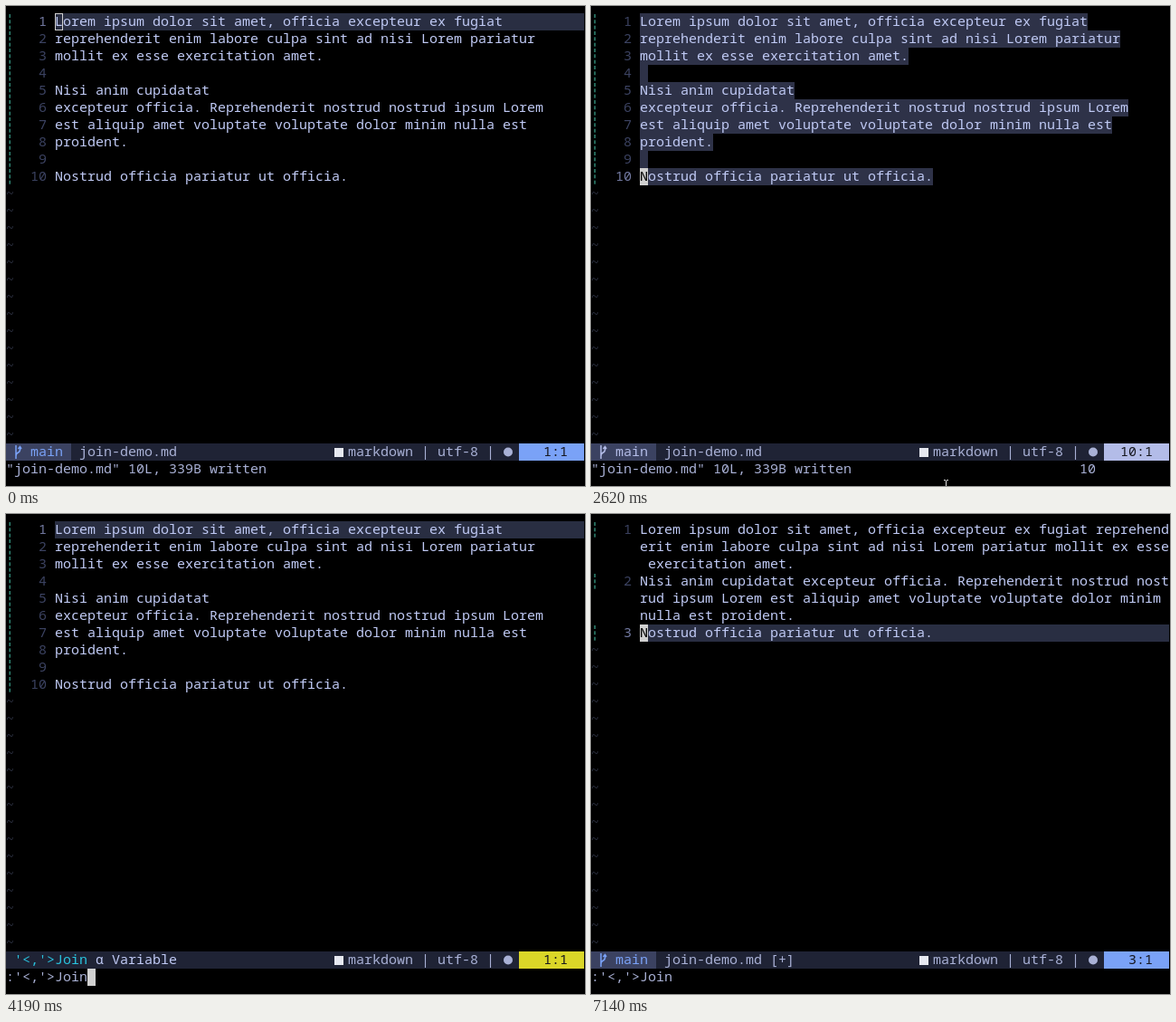
Recreate the animation shown at these times as an HTML page with a canvas. Size 640 px wide and 530 px high, loop 7.9 s.

```html
<!DOCTYPE html>
<html lang="en">
<head>
<meta charset="utf-8">
<style>
  html, body { margin: 0; background: #000; overflow: hidden; }
  canvas { display: block; }
</style>
</head>
<body>
<canvas id="screen" width="640" height="530"></canvas>
<script>
const ctx = document.getElementById('screen').getContext('2d');
const LOOP = 7900, CW = 9, RH = 19, TOP = 8, GUTTER = 6, COLS = 71;
const STATUS = 25, COMMAND = 26;
const FG = '#c0caf5', DIM = '#a9b1d6', BAR = '#1f2335', CURSOR = '#d0d0d0';
const CURSOR_LINE = '#292e42', VISUAL = '#2e3248', SIGN = '#2f8573';
const MODE_COLOR = { normal: '#7aa2f7', visual: '#b3bce8', command: '#dad628' };

const before = [
  'Lorem ipsum dolor sit amet, officia excepteur ex fugiat',
  'reprehenderit enim labore culpa sint ad nisi Lorem pariatur',
  'mollit ex esse exercitation amet.',
  '',
  'Nisi anim cupidatat',
  'excepteur officia. Reprehenderit nostrud nostrud ipsum Lorem',
  'est aliquip amet voluptate voluptate dolor minim nulla est',
  'proident.',
  '',
  'Nostrud officia pariatur ut officia.'
];
const after = before.join('\n').split('\n\n').map(p => p.replace(/\n/g, ' '));

const rowY = row => TOP + row * RH;

function cells(col, row, count, color) {
  ctx.fillStyle = color;
  ctx.fillRect(col * CW, rowY(row), count * CW, RH);
}

function text(str, col, row, color) {
  ctx.fillStyle = color;
  ctx.fillText(str, col * CW, rowY(row) + 14);
}

function cursor(col, row, char = '') {
  cells(col, row, 1, CURSOR);
  text(char, col, row, '#000');
}

function sign(row) {
  ctx.fillStyle = SIGN;
  for (let i = 0; i < 3; i++) ctx.fillRect(3.5, rowY(row) + 1 + i * RH / 3, 1.5, 4);
}

// Wraps a buffer line to the window width.
const wrap = line => line.match(/.{1,65}/g) || [''];

// Draws the buffer; returns the first screen row of the active line.
function buffer(lines, active, selectTo, highlight) {
  let row = 0, activeRow = 0;
  lines.forEach((line, i) => {
    const number = String(i + 1);
    if (i === active) activeRow = row;
    sign(row);
    text(number, 5 - number.length, row, i === active ? '#737aa2' : '#3b4261');
    for (const part of wrap(line)) {
      if (i <= selectTo) cells(GUTTER, row, Math.max(1, part.length), VISUAL);
      else if (i === active && highlight) cells(GUTTER, row, COLS - GUTTER, CURSOR_LINE);
      text(part, GUTTER, row++, FG);
    }
  });
  while (row < STATUS) text('~', 0, row++, '#2b3040');
  return activeRow;
}

function branchIcon(color) {
  ctx.strokeStyle = color;
  ctx.lineWidth = 1.5;
  ctx.stroke(new Path2D('M11 485V500M11 497Q11 494 13.5 493T15.5 487M13.5 489L15.5 486.5L17 489'));
}

function statusBar(mode, file, position, matched) {
  const color = MODE_COLOR[mode];
  cells(0, STATUS, COLS, BAR);
  if (matched) {
    const item = "'<,'>Join";
    text(item, 1, STATUS, FG);
    cells(1, STATUS, matched, BAR);
    text(item.slice(0, matched), 1, STATUS, '#2ac3de');
    text('α Variable', 11, STATUS, FG);
  } else {
    cells(0, STATUS, 8, '#3b4261');
    branchIcon(color);
    text('main', 3, STATUS, color);
    text(file, 9, STATUS, DIM);
  }
  ctx.fillStyle = '#e6e8f0';
  ctx.fillRect(363, 488, 10, 10);
  text('markdown | utf-8 |', 42, STATUS, DIM);
  ctx.beginPath();
  ctx.arc(555, 492.5, 5, 0, 7);
  ctx.fill();
  cells(63, STATUS, 8, color);
  text(position.padStart(6), 63, STATUS, '#15161e');
}

function pointer() {
  ctx.fillStyle = '#e8e8e8';
  ctx.fillRect(390, 523, 2, 1);
  ctx.fillRect(393, 523, 2, 1);
  ctx.fillRect(392, 524, 1, 6);
}

const countPassed = (t, times) => times.filter(at => t >= at).length;

function drawEditing(t) {
  const mode = t < 2140 ? 'normal' : t < 3190 ? 'visual' : 'command';
  const completing = t >= 3580;
  const active = t >= 2620 && !completing ? 9 : 0;
  const selecting = t >= 2140 && !completing;
  const row = buffer(before, active, selecting ? active : -1, !selecting);

  if (mode !== 'command') {
    if (t >= 450) cursor(GUTTER, row, before[active][0]);
    else {
      ctx.strokeStyle = CURSOR;
      ctx.lineWidth = 1;
      ctx.strokeRect(GUTTER * CW + .5, rowY(row) + .5, CW - 1, RH - 1);
    }
    text('"join-demo.md" 10L, 339B written', 0, COMMAND, DIM);
    if (selecting) text(String(active + 1), 60, COMMAND, DIM);
  } else {
    if (!completing) {
      cells(GUTTER, row, 1, '#000');
      text(before[active][0], GUTTER, row, FG);
    }
    const typed = ":'<,'>" + 'Join'.slice(0, countPassed(t, [3430, 3830, 3980, 4150]));
    text(typed, 0, COMMAND, DIM);
    cursor(typed.length, COMMAND);
  }
  const matched = completing ? 6 + countPassed(t, [3870, 4030, 4190]) : 0;
  const line = t >= 2620 && t < 3430 ? 10 : 1;
  statusBar(mode, 'join-demo.md', line + ':1', matched);
  if (t >= 490 && t < 3430) pointer();
}

function drawJoined(t) {
  const active = countPassed(t, [6390, 7140]);
  const row = buffer(after, active, -1, true);
  if (active) cursor(GUTTER, row, after[active][0]);
  else cursor(4, row, '1');
  statusBar('normal', 'join-demo.md [+]', active + 1 + ':1');
  text(":'<,'>Join", 0, COMMAND, DIM);
}

function frame() {
  const t = performance.now() % LOOP;
  ctx.fillStyle = '#000';
  ctx.fillRect(0, 0, 640, 530);
  ctx.font = '15px "Noto Sans Mono", monospace';
  (t < 4680 ? drawEditing : drawJoined)(t);
  requestAnimationFrame(frame);
}
frame();
</script>
</body>
</html>
```
